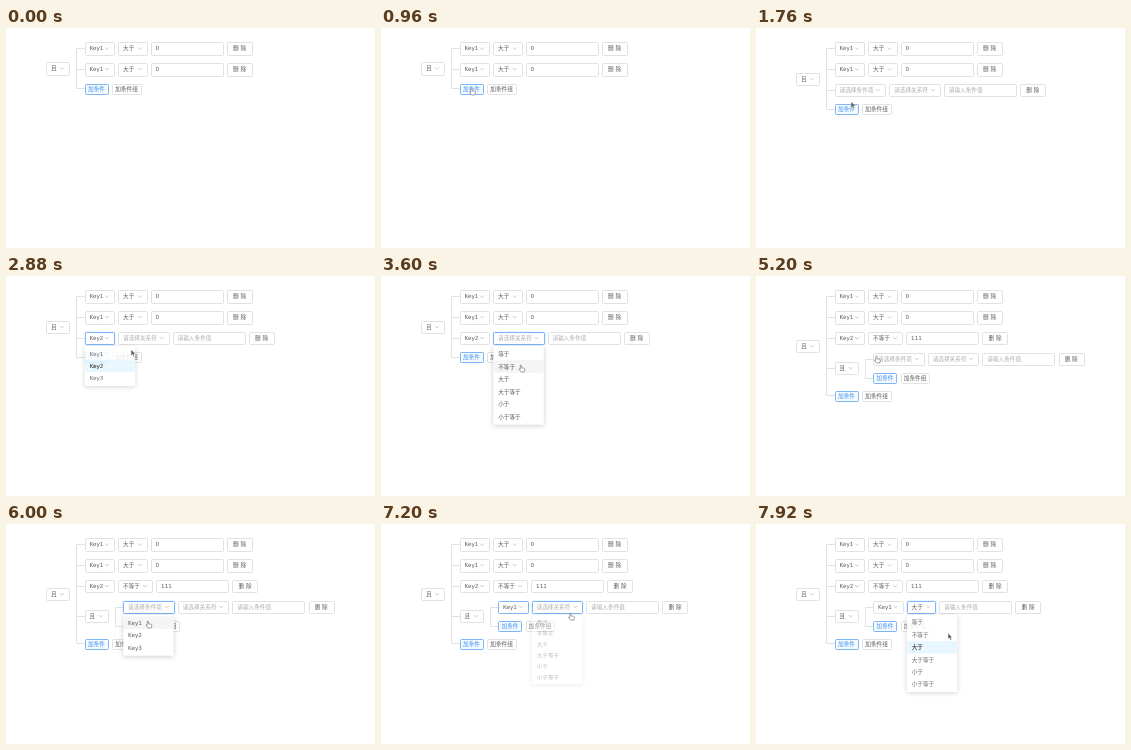
Write an HTML page that moves like this. It is 369 px wide and 220 px high and loops after 8000 ms.

```html
<!DOCTYPE html>
<html lang="zh">
<head>
<meta charset="utf-8">
<style>
  html, body { margin: 0; width: 100%; height: 100%; overflow: hidden; background: #fff; }
  svg { display: block; width: 369px; height: 220px; }
  text { font: 5.65px "DejaVu Sans", "Noto Sans CJK SC", "Noto Sans CJK", sans-serif; white-space: pre; }
</style>
</head>
<body>
<svg id="stage" viewBox="0 0 369 220"></svg>
<script>
const LOOP = 8000;
const stage = document.getElementById('stage');
const INK = '#5c5c5c', PALE = '#adadad', LINE = '#e2e2e2', BLUE = '#7db5f5', LINK = '#3f92f0';
const GAP = 4.1, PAD = 4.9, LEFT = 78.7, INNER = 117.2;
const KEYS = ['Key1', 'Key2', 'Key3'];
const RELATIONS = ['等于', '不等于', '大于', '大于等于', '小于', '小于等于'];
const HINTS = ['请选择条件项', '请选择关系符', '请输入条件值'];

// Pointer path: time, x, y, shape
const PATH = [
  [240, 41, 14, 'arrow'], [320, 41, 14, 'arrow'], [640, 62, 36, 'arrow'],
  [960, 90, 60, 'hand'], [1280, 91, 64, 'hand'], [1600, 94, 72, 'arrow'],
  [1760, 95, 73.5, 'arrow'], [1920, 98, 67, 'hand'], [2080, 100, 63, 'hand'],
  [2320, 103, 70, 'hand'], [2560, 110, 89, 'hand'], [2720, 113, 89, 'hand'],
  [2800, 118, 82, 'arrow'], [2880, 125, 73.5, 'arrow'], [3040, 136, 64, 'hand'],
  [3200, 137, 64, 'hand'], [3520, 139, 89, 'hand'], [3680, 140, 89, 'hand'],
  [3840, 152, 79, 'arrow'], [4000, 178, 66, 'beam'], [4240, 200, 60.5, 'beam'],
  [4640, 200, 60.5, 'beam'], [4880, 150, 74, 'arrow'], [5040, 120, 80, 'hand'],
  [5360, 120, 80, 'arrow'], [5600, 139, 83, 'hand'], [5760, 140, 84, 'hand'],
  [6000, 141.5, 97, 'hand'], [6320, 142, 97, 'hand'], [6480, 150, 94, 'arrow'],
  [6720, 170, 92, 'arrow'], [6960, 170, 92, 'arrow'], [7120, 188, 88.5, 'hand'],
  [7200, 189, 89, 'hand'], [7520, 190, 123, 'hand'], [7760, 191, 122, 'hand'],
  [7840, 192, 116, 'arrow'], [7920, 192, 109, 'arrow'], [8000, 192, 102, 'arrow']
];

// Dropdowns: opening, pick and closing times
const MENUS = [
  { open: 2120, pick: 2700, close: 2830, x: LEFT, y: 62, items: KEYS, chosen: 1 },
  { open: 3100, pick: 3680, close: 3760, x: 112.3, y: 62, items: RELATIONS, chosen: 1 },
  { open: 5660, pick: 6320, close: 6400, x: INNER, y: 82.8, items: KEYS, chosen: 0 },
  { open: 7155, pick: 7740, close: 7880, x: 150.8, y: 82.8, items: RELATIONS, chosen: 2 }
];

const clamp = v => Math.max(0, Math.min(1, v));
const snap = v => Math.round(v) + 0.5;
const selectWidth = s => /^Key/.test(s) ? 29.3 : s.length * 5.5 + 17.5;

function label(x, cy, s, color = INK, extra = '') {
  return `<text x="${x}" y="${cy + 2}" fill="${color}" ${extra}>${s}</text>`;
}

function box(x, cy, w, h, color = LINE, fill = '#fff', ring = false) {
  const l = snap(x), t = snap(cy - h / 2), r = snap(x + w), b = snap(cy + h / 2);
  const shape = (grow, attrs) => `<rect x="${l - grow}" y="${t - grow}" width="${r - l + 2 * grow}" height="${b - t + 2 * grow}" rx="1" ${attrs}/>`;
  return (ring ? shape(0.8, 'fill="none" stroke="#1890ff" stroke-opacity=".1"') : '')
    + shape(0, `fill="${fill}" stroke="${color}"`);
}

function line(d) {
  return `<path d="${d}" fill="none" stroke="${LINE}"/>`;
}

function select(x, cy, value, hint, focus, hover) {
  const s = value || hint, w = selectWidth(s), c = x + w - 7;
  return box(x, cy, w, 12.6, focus || hover ? BLUE : LINE, '#fff', focus)
    + label(x + PAD, cy, s, value ? INK : PALE)
    + `<path d="M${c - 2} ${cy - 1}l2 2 2-2" fill="none" stroke="#bbb" stroke-width=".7"/>`;
}

function button(x, cy, s, primary) {
  return box(x, cy, s.length * 5.5 + 6.5, 10, primary ? BLUE : LINE, primary ? '#f5faff' : '#fff')
    + label(x + 3.3, cy, s, primary ? LINK : INK);
}

const addButtons = (x, cy) => button(x, cy, '加条件', true) + button(x + 27.3, cy, '加条件组');

function row(x, cy, { key, relation, value, focus, hover, caret }) {
  let out = select(x, cy, key, HINTS[0], focus === 'key', hover === 'key');
  x += selectWidth(key || HINTS[0]) + GAP;
  out += select(x, cy, relation, HINTS[1], focus === 'relation', hover === 'relation');
  x += selectWidth(relation || HINTS[1]) + GAP;
  const active = focus === 'value';
  out += box(x, cy, 72, 12.6, active ? BLUE : LINE, '#fff', active)
    + label(x + PAD, cy, value || HINTS[2], value ? INK : PALE);
  if (caret) {
    const cx = x + PAD + (value ? value.length * 3.6 : 0);
    out += `<path d="M${cx} ${cy - 3.2}v6.4" stroke="#777" stroke-width=".6"/>`;
  }
  x += 72 + GAP;
  return out + box(x, cy, 25, 12.6) + label(x + 12.7, cy, '删 除', INK, 'text-anchor="middle"');
}

function menu(m, t, pointer) {
  const closing = t >= m.close;
  const p = closing ? 1 - clamp((t - m.close) / 220) : clamp((t - m.open) / 200);
  if (t < m.open || p <= 0) return '';
  const shown = closing ? Math.sqrt(p) : 1 - (1 - p) ** 2;
  const top = m.y + 8, step = 12.6, height = m.items.length * step + 3.2;
  const picked = t >= m.pick;
  const active = picked ? m.chosen : Math.floor((pointer.y - top - 1.6) / step);
  const items = m.items.map((s, i) => {
    const y = top + 1.6 + i * step, on = i === active;
    return (on ? `<rect x="${m.x}" y="${y}" width="50.5" height="${step}" fill="${picked ? '#e6f7ff' : '#f5f5f5'}"/>` : '')
      + label(m.x + PAD, y + step / 2, s, on && picked ? '#333' : INK,
        on && picked ? 'stroke="#333" stroke-width=".15"' : '');
  }).join('');
  return `<g opacity="${shown}" transform="translate(0 ${top}) scale(1 ${0.8 + 0.2 * shown}) translate(0 ${-top})">
    <rect x="${m.x}" y="${top}" width="50.5" height="${height}" rx="1.5" fill="#fff"
      style="filter:drop-shadow(0 1.5px 2.5px rgba(0,0,0,.2))"/>${items}</g>`;
}

function pointerAt(t) {
  const i = PATH.findIndex((k, n) => t >= k[0] && (n === PATH.length - 1 || t < PATH[n + 1][0]));
  if (i < 0) return null;
  const [t0, x0, y0, shape] = PATH[i];
  const [t1, x1, y1] = PATH[i + 1] || PATH[i];
  const p = t1 > t0 ? (t - t0) / (t1 - t0) : 0;
  return { x: x0 + (x1 - x0) * p, y: y0 + (y1 - y0) * p, shape };
}

const SHAPES = {
  arrow: '<path d="M0 0v6.2l1.4-1.2 1 2.3 1.2-.5-1-2.2h1.9z" fill="#555" stroke="#fff" stroke-width=".5"/>',
  hand: '<path d="M-.2 .3q.7-.7 1.2 .2v2.2l2.7 .6q.8 .3 .6 1.3l-.5 2.4h-3.3l-2-2.8q.3-.9 1.3 0z" fill="#fff" stroke="#666" stroke-width=".6"/>',
  beam: '<path d="M-1.5-3q1.5 0 1.5 1v4q0 1-1.5 1M1.5-3q-1.5 0-1.5 1M0 2q0 1 1.5 1" fill="none" stroke="#777" stroke-width=".7"/>'
};

function render(t) {
  const pointer = pointerAt(t);
  const hasThird = t >= 1040, hasGroup = t >= 5120;
  const within = (a, b) => t >= a && t < b;
  const addY = hasGroup ? 119.8 : hasThird ? 81.3 : 60.5;
  const rootY = (20.4 + addY) / 2;
  const filled = { key: 'Key1', relation: '大于', value: '0' };

  let out = line(`M79 20.5H70.5V${snap(addY - 0.5)}H79M70.5 41.5H79`)
    + select(40, rootY, '且')
    + row(LEFT, 20.4, filled) + row(LEFT, 41.2, filled);

  if (hasThird) {
    out += line('M70.5 62.5H79') + row(LEFT, 62, {
      key: t >= 2700 && 'Key2',
      relation: t >= 3680 && '不等于',
      value: '1'.repeat(Math.max(0, Math.min(3, Math.floor((t - 4480) / 80)))),
      focus: within(2120, 3080) ? 'key' : within(3080, 4160) ? 'relation' : within(4160, 5040) ? 'value' : '',
      hover: within(1120, 1440) || within(1880, 2120) ? 'key' : within(4160, 4400) ? 'relation' : '',
      caret: within(4240, 5040)
    });
  }
  if (hasGroup) {
    out += line('M70.5 92.5H79M117 83.5H109.5V102.5H117')
      + select(LEFT, 92, '且')
      + row(INNER, 82.8, {
        key: t >= 6320 && 'Key1',
        relation: t >= 7740 && '大于',
        focus: within(5640, 7100) ? 'key' : t >= 7100 ? 'relation' : '',
        hover: within(5520, 5640) || within(7100, 7300) ? 'key' : ''
      })
      + addButtons(INNER, 102);
  }
  out += addButtons(LEFT, addY);
  if (pointer) {
    out += MENUS.map(m => menu(m, t, pointer)).join('')
      + `<g transform="translate(${pointer.x} ${pointer.y})">${SHAPES[pointer.shape]}</g>`;
  }
  stage.innerHTML = out;
}

const start = performance.now();
function tick() {
  render((performance.now() - start) % LOOP);
  requestAnimationFrame(tick);
}
tick();
</script>
</body>
</html>
```
